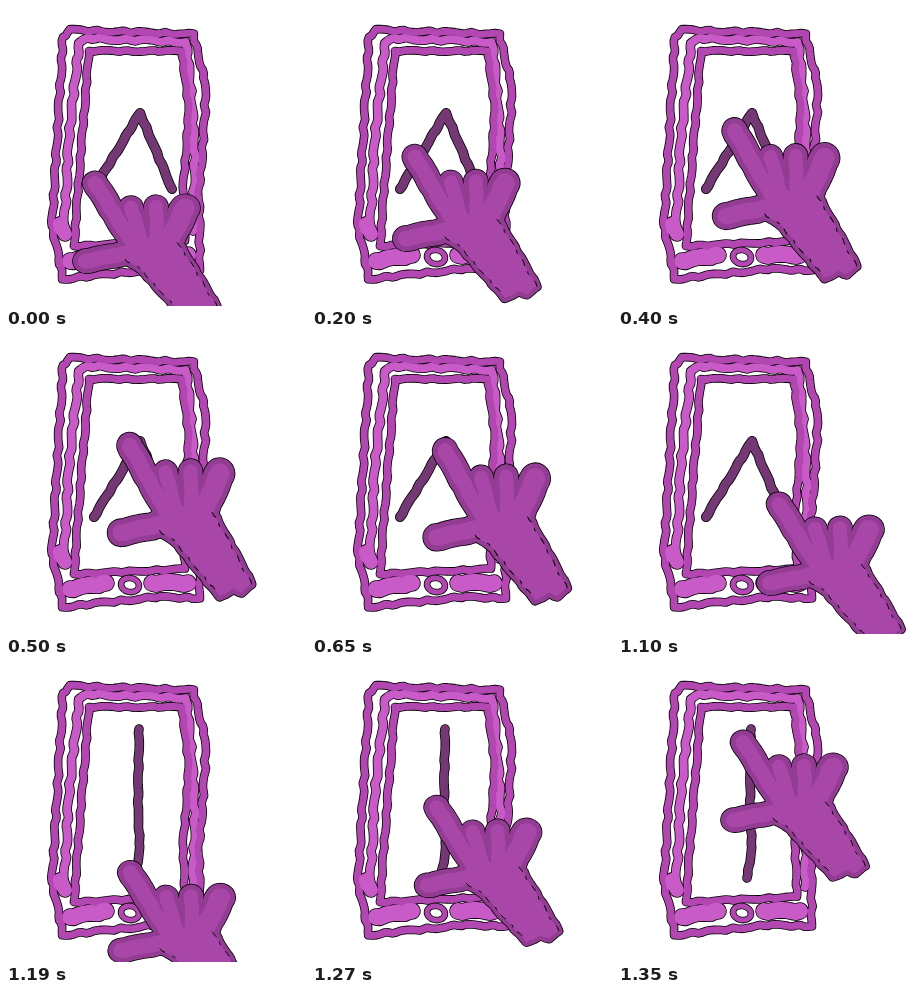
An HTML page with a canvas for the animation above (1.85 s loop, 300x300 px).

```html
<!DOCTYPE html>
<html lang="en">
<head>
<meta charset="utf-8">
<title>Swipe gesture</title>
<style>
  html, body { margin: 0; width: 100%; height: 100%; overflow: hidden; background: #fff; }
  canvas { display: block; width: 100vw; height: 100vh; }
</style>
</head>
<body>
<canvas id="stage" width="300" height="300"></canvas>
<script>
const ctx = document.getElementById('stage').getContext('2d');
const LOOP = 1850;
const COLORS = { frame: '#b347b2', band: '#c95bc8', line: '#743875', edge: '#923c93', skin: '#a947a8' };

const lerp = (a, b, p) => a + (b - a) * p;

// Resamples a polyline and shakes it sideways like a hand-held brush.
function shaky(points, amount = 1) {
  const path = new Path2D();
  let n = 0;
  points.slice(1).forEach(([bx, by], i) => {
    const [ax, ay] = points[i];
    const length = Math.hypot(bx - ax, by - ay);
    const steps = Math.ceil(length / 4);
    for (let k = 0; k < steps; k++, n++) {
      const shift = amount * Math.sin(n * 1.1 + Math.sin(n * 0.7));
      path.lineTo(lerp(ax, bx, k / steps) - (by - ay) / length * shift,
                  lerp(ay, by, k / steps) + (bx - ax) / length * shift);
    }
  });
  path.lineTo(...points.at(-1));
  return path;
}

function stroke(path, color, width) {
  ctx.strokeStyle = color;
  ctx.lineWidth = width;
  ctx.stroke(path);
}

// Paints several brush strokes over one shared black fringe.
function paint(strokes) {
  strokes.forEach(({ path, width }) => stroke(path, '#000', width + 1.6));
  strokes.forEach(({ path, color, width }) => stroke(path, color, width));
}

const brush = (points, color, width, amount) => ({ path: shaky(points, amount), color, width });

const homeRing = new Path2D();
homeRing.ellipse(124, 251, 9, 7, .2, 0, Math.PI * 2);

const phone = [
  brush([[58, 226], [63, 130], [73, 38], [82, 32], [180, 36], [185, 85], [189, 150], [187, 225]], COLORS.band, 8, 1.1),
  brush([[57, 31], [64, 24], [187, 28], [199, 75], [199, 110], [193, 185], [194, 264],
    [150, 263], [57, 273], [46, 220], [57, 31]], COLORS.frame, 7),
  brush([[83, 45], [176, 45], [183, 105], [177, 185], [179, 235], [68, 240], [73, 170], [83, 45]], COLORS.frame, 7, .7),
  brush([[54, 218], [59, 228]], COLORS.band, 14),
  brush([[64, 255], [100, 249]], COLORS.band, 16),
  brush([[146, 249], [182, 249]], COLORS.band, 16),
  { path: homeRing, color: COLORS.frame, width: 5 }
];
const chevron = brush([[88, 183], [134, 107], [166, 183]], COLORS.line, 8.5, .5);
const upright = brush([[133, 67], [132, 150], [134, 185], [129, 216]], COLORS.line, 8, .5);

// Fingers are thick strokes from tip to palm, relative to the index fingertip.
const finger = (x, y, baseX, baseY, radius) =>
  ({ path: shaky([[x, y], [baseX, baseY]], .4), radius });
const fingers = [
  finger(0, 0, 36, 62, 12.5),
  finger(36, 26, 46, 62, 12),
  finger(61, 25, 62, 62, 12),
  finger(90, 27, 74, 62, 15),
  finger(-9, 84, 34, 75, 13)
];
const leftSide = [[30, 82], [48, 95], [90, 145]];
const rightSide = [[122, 133], [90, 76], [80, 58]];
const arm = shaky([...leftSide, [104, 138], [112, 141], ...rightSide, [36, 60], leftSide[0]], .5);
const armSides = [leftSide, rightSide].map(side => shaky(side));

function handLayer(color, inset) {
  fingers.forEach(({ path, radius }) => stroke(path, color, 2 * (radius - inset)));
  ctx.fillStyle = color;
  ctx.fill(arm);
  if (inset <= 0) stroke(arm, color, 9 - 2 * inset);
}

function drawHand({ x, y, stretch }) {
  ctx.save();
  ctx.translate(x, y);
  ctx.scale(1, stretch);
  handLayer('#000', -.8);
  handLayer(COLORS.edge, 0);
  handLayer(COLORS.skin, 5);
  ctx.setLineDash([6, 9, 3, 7]);
  armSides.forEach(side => stroke(side, '#000', 1));
  ctx.restore();
}

const pose = (x, y, stretch) => ({ x, y, stretch });
const START = pose(89, 177, .93);
const PEAK = pose(127, 105, 1.05);
const END = pose(161, 170, .94);
const LOW = pose(124, 243, .93);
const HIGH = pose(125, 80, .93);

const blend = (a, b, p) =>
  pose(lerp(a.x, b.x, p), lerp(a.y, b.y, p), lerp(a.stretch, b.stretch, p));

function poseAt(time) {
  if (time >= 1150) return blend(LOW, HIGH, Math.min(1, Math.floor((time - 1150) / 20) / 10));
  const progress = Math.floor(time / 50) / 11;
  return progress < 1 ? blend(START, PEAK, progress) : blend(PEAK, END, progress - 1);
}

function draw(now) {
  const time = now % LOOP;
  ctx.fillStyle = '#fff';
  ctx.fillRect(0, 0, 300, 300);
  paint(phone);
  paint([time < 1150 ? chevron : upright]);
  drawHand(poseAt(time));
}

let origin;
function tick(now) {
  origin ??= now;
  draw(now - origin);
  requestAnimationFrame(tick);
}
ctx.lineCap = ctx.lineJoin = 'round';
draw(0);
requestAnimationFrame(tick);
</script>
</body>
</html>
```
